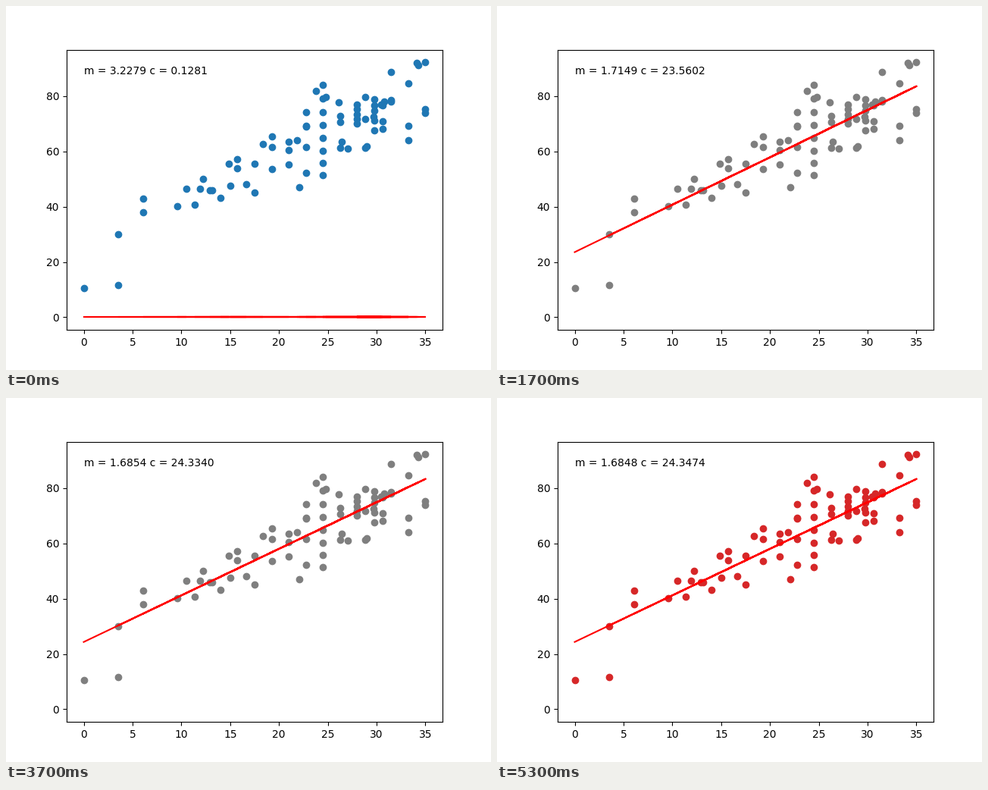
A matplotlib script that plays this animation: 640 by 480 pixels, repeating every 5400 ms.

```python
import numpy as np
import matplotlib.pyplot as plt
from matplotlib.animation import FuncAnimation

FRAMES = 54
INTERVAL = 100
SLOPE, BASE = 1.68482, 24.34795
rng = np.random.default_rng(4)


def column(x, *keys, n=3):
    """n points at one x, spread from top to bottom along the key heights."""
    spots = np.linspace(0, len(keys) - 1, n)
    return np.full(n, x), np.interp(spots, range(len(keys)), keys)


def curve(xs, start, y0, rise=0, bend=0):
    """Points on a parabola that passes through (start, y0)."""
    d = np.array(xs) - start
    return np.array(xs), y0 + rise * d + bend * d**2


def stragglers(n):
    """Loose points around the final fit, between the columns."""
    x = rng.uniform(21, 31, n)
    return x, BASE + SLOPE * x + rng.normal(0, 6, n)


def make_data():
    parts = [
        # sparse left side
        ([0], [10.4]),
        column(3.5, 30, 11.6, n=2),
        column(6.1, 42.9, 38, n=2),
        # upper, middle and lower edge of the climb
        curve([10.5, 12.25, 14.875, 15.75, 18.375], 10.5, 46.5, rise=2.05),
        curve([11.9, 12.95, 13.125, 15], 13, 45.9, bend=0.45),
        curve([9.57, 11.375, 14, 16.65], 9.8, 40.3, bend=0.165),
        # dense right side
        column(17.5, 55.5, 45.1, n=2),
        column(19.25, 65.4, 61.6, 53.6),
        column(21, 63.5, 60.4, 55.3),
        column(22.75, 74.2, 66.3, 52.2, n=4),
        column(24.5, 84.1, 67, 51.4, n=8),
        column(26.25, 72.8, 70.6, 61.3),
        column(28, 77, 70, n=5),
        column(28.8, 79.7, 71.7, 61.3),
        column(29.75, 78.9, 74.7, 67.6, n=5),
        column(30.6, 76.7, 70.9, 68.1),
        column(31.5, 88.8, 78.6, 78),
        column(33.25, 84.6, 69.3, 64),
        column(35, 92.2, 75.3, 73.9),
        # lone points
        ([15.75, 22.1, 23.8, 34.1, 34.3], [53.9, 47, 81.9, 92, 91.2]),
        stragglers(10),
    ]
    return [np.concatenate(axis) for axis in zip(*parts)]


def fit(k):
    """Slope and intercept of the gradient descent after k thousand steps."""
    if k == 0:
        return 3.2279, 0.1281
    gap = 24.2426 * np.exp(-0.20157 * k)
    return SLOPE + 0.03816 * gap, BASE - gap


X, Y = make_data()
# The fit is drawn back and forth through loosely sorted points
LINE_X = X[np.argsort(X + rng.normal(0, 4, X.size))]

fig, ax = plt.subplots(figsize=(6.4, 4.8), dpi=100)
ax.set_xlim(-1.75, 36.75)
ax.set_ylim(-4.61, 96.81)
dots = ax.scatter(X, Y)
line, = ax.plot(LINE_X, 0 * LINE_X, color="red")
label = ax.text(0, 88, "")


def update(k):
    m, c = fit(k)
    dots.set_color(f"C{k % 10}")
    # The first line is the prediction before any step
    line.set_ydata(m * LINE_X + c if k else 0 * LINE_X)
    label.set_text(f"m = {m:.4f} c = {c:.4f}")
    return dots, line, label


anim = FuncAnimation(fig, update, frames=FRAMES, interval=INTERVAL,
                     repeat=True, repeat_delay=0)
plt.show()
```
